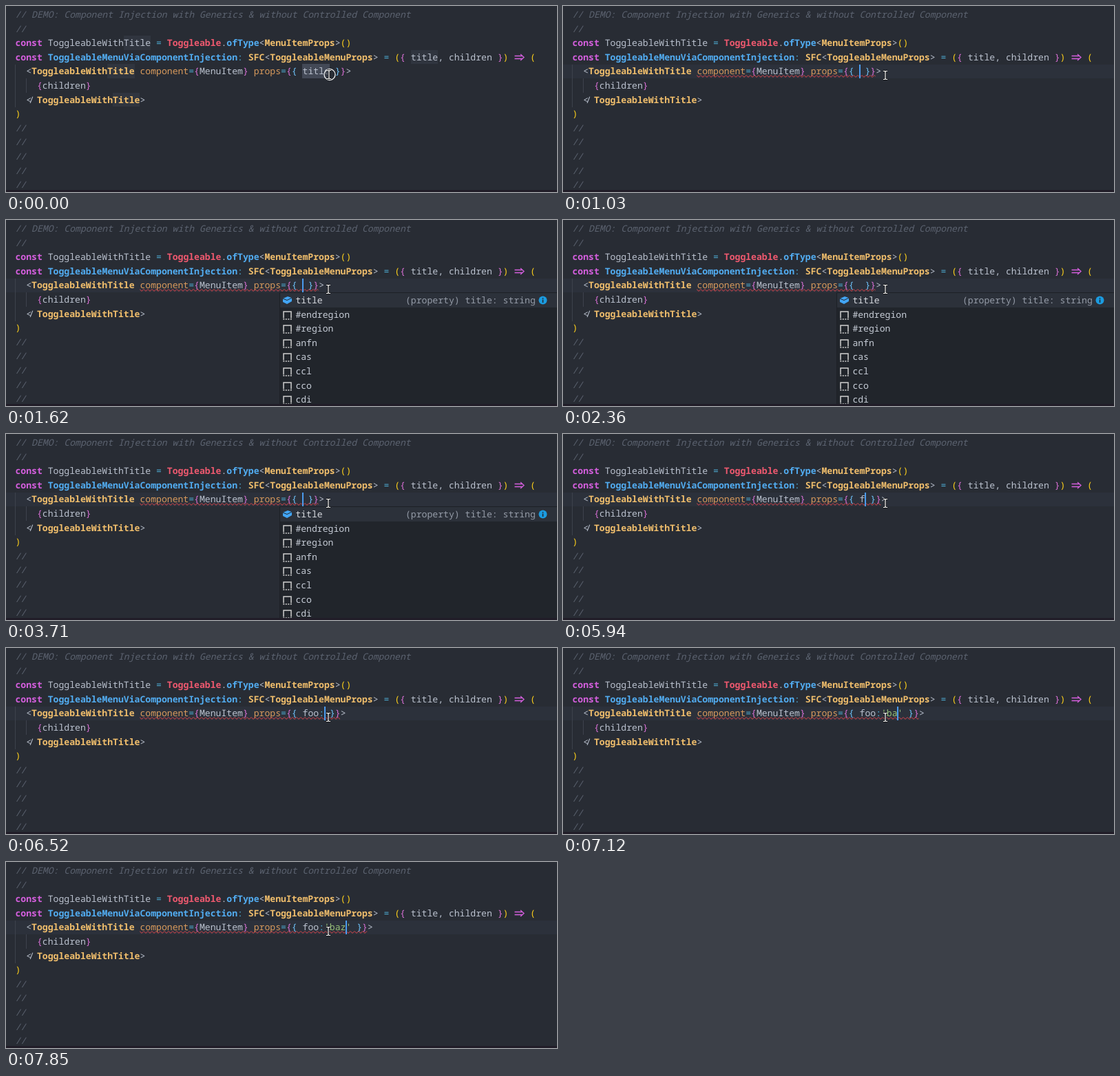
An HTML page for the animation above (8000 ms loop, 800 px wide and 270 px high).

```html
<!DOCTYPE html>
<html lang="en">
<head>
<meta charset="utf-8">
<title>Editor demo</title>
<style>
html, body { margin: 0; width: 100%; height: 100%; overflow: hidden; background: #282c34; }
#stage {
  position: relative; width: 800px; height: 270px; overflow: hidden; background: #282c34;
  font: 500 13.125px/20.6px "Noto Sans Mono", monospace; color: #bbc2cf;
  text-rendering: geometricPrecision; font-variant-ligatures: none;
}
#stage div, #stage svg { position: absolute; }
#stage [hidden] { display: none; }
#code { left: 13.5px; top: 2.1px; white-space: pre; }
#code > pre { position: relative; margin: 0; font: inherit; }
b, i { font-weight: inherit; font-style: normal; }
.comment { color: #5c6370; font-style: italic; font-weight: 400; }
.key { color: #d55fde; font-weight: 600; }
.type { color: #f0be6c; font-weight: 600; }
.class { color: #ef596f; font-weight: 600; }
.func { color: #52adf2; font-weight: 600; }
.op { color: #4fb0d8; }
.attr { color: #d89a5c; }
.str { color: #98c379; }
.gold { color: #ffd11a; }
.pink { color: #da70d6; }
.sky { color: #6fc3fa; }
.slash { position: relative; left: -4px; }
#active { left: 0; top: 84.7px; width: 800px; height: 20.3px; background: #2c313b; }
.guide { width: 1px; background: #3d424c; }
.match { width: 5ch; height: 20.6px; background: #30353f; }
.match.chosen { background: #434956; }
#caret { top: 83.4px; width: 2px; height: 19.6px; background: #4a9bee; }
#wave { left: 23ch; top: 98.4px; height: 4px; }
#strip { left: 0; top: 267px; width: 800px; height: 3px; background: #211d28; }
#menu { left: 397px; top: 105px; width: 410px; height: 170px; background: #21252b; border: 1px solid #1d2026; }
.row { left: 0; width: 410px; height: 20.6px; white-space: pre; color: #c6ccd6; }
.row span { position: absolute; left: 22.4px; }
.row.first { background: #2c313a; color: #d7dae0; }
.row .detail { left: 182px; color: #959ca8; }
.row svg { left: 3px; top: 3px; }
</style>
</head>
<body>
<div id="stage">
  <div id="active"></div>
  <div class="guide" style="left:13px;top:85px;height:62px"></div>
  <div class="guide" style="left:29px;top:105px;height:21px"></div>
  <div id="code"><div id="matches"></div><pre><b class="comment">// DEMO: Component Injection with Generics &amp; without Controlled Component
//</b>
<b class="key">const</b> ToggleableWithTitle <b class="op">=</b> <b class="class">Toggleable</b>.<b class="func">ofType</b>&lt;<b class="type">MenuItemProps</b>&gt;<b class="gold">()</b>
<b class="key">const</b> <b class="func">ToggleableMenuViaComponentInjection</b><b class="op">:</b> <b class="type">SFC</b>&lt;<b class="type">ToggleableMenuProps</b>&gt; <b class="op">=</b> <b class="gold">(</b><b class="pink">{</b> title, children <b class="pink">}</b><b class="gold">)</b>    <b class="gold">(</b>
  &lt;<b class="type">ToggleableWithTitle</b> <b class="attr">component</b><b class="op">=</b><b class="pink">{</b>MenuItem<b class="pink">}</b> <b class="attr">props</b><b class="op">=</b><b class="pink">{</b><b class="sky">{</b> <i id="value"></i> <b class="sky">}</b><b class="pink">}</b>&gt;
    <b class="pink">{</b>children<b class="pink">}</b>
  &lt;<b class="slash">/</b><b class="type">ToggleableWithTitle</b>&gt;
<b class="gold">)</b>
<b class="comment">//
//
//
//
//</b></pre>
    <svg id="wave"><defs><pattern id="zig" width="6" height="4" patternUnits="userSpaceOnUse">
      <path d="M-1 1L0 .4L3 3.4L6 .4L7 1" fill="none" stroke="#e5454c"/>
    </pattern></defs><rect width="100%" height="4" fill="url(#zig)"/></svg>
    <div id="caret"></div>
  </div>
  <svg style="left:737px;top:67px" width="18" height="15" fill="none" stroke="#d55fde" stroke-width="1.3">
    <path d="M1.5 5.5H13M1.5 9.5H13M10 3L15 7.5L10 12"/>
  </svg>
  <div id="menu"></div>
  <div id="strip"></div>
  <svg style="left:456px;top:86px" width="28" height="28" fill="none">
    <circle id="press" cx="14" cy="13.5" r="8" fill="#282c34" fill-opacity=".5" stroke="#f2f2f2" stroke-width="1.3"/>
    <g id="pointer">
      <path d="M9 8.5H11L12 9.5L13 8.5H15M12 9.5V19.5M9 20.5H11L12 19.5L13 20.5H15" stroke="#111" stroke-width="2.6"/>
      <path d="M9 8.5H11L12 9.5L13 8.5H15M12 9.5V19.5M9 20.5H11L12 19.5L13 20.5H15" stroke="#fff" stroke-width="1.2"/>
    </g>
  </svg>
</div>
<script>
const LOOP = 8000, LINE = 20.6, VALUE_COL = 53;
const el = id => document.getElementById(id);

// Occurrences of the selected word: line, column
const words = [[2, 20], [3, 73], [4, 17], [6, 18], [4, VALUE_COL]];
el('matches').innerHTML = words.map(([line, col], i) =>
  `<div class="match${i === 4 ? ' chosen' : ''}" style="left:${col}ch;top:${line * LINE}px"></div>`).join('');

const cube = `<svg width="15" height="15"><path d="M1 5L8 2L14 4V9L7 13L1 10Z" fill="#42a5f5"/>
  <path d="M1 5L7 7.5L14 4" fill="none" stroke="#21252b"/></svg>`;
const snippet = `<svg width="16" height="16" fill="none" stroke="#d0d0d0" stroke-width="1.5">
  <path d="M2 12.5V3H13V12.5"/><path d="M1.3 14H14" stroke-dasharray="2 1.5"/></svg>`;
const info = `<svg style="left:375px;top:4px" width="13" height="13"><circle cx="6.5" cy="6.5" r="6" fill="#1b9be0"/>
  <path d="M6.5 3V4.4M6.5 5.5V10" stroke="#21252b" stroke-width="1.5"/></svg>`;
const items = ['title', '#endregion', '#region', 'anfn', 'cas', 'ccl', 'cco', 'cdi'];
el('menu').innerHTML = items.map((name, i) =>
  `<div class="row${i ? '' : ' first'}" style="top:${i * LINE}px">${i ? snippet : cube}<span>${name}</span>${
    i ? '' : `<span class="detail">(property) title: string</span>${info}`}</div>`).join('');

// Each track lists [start ms, value]; a value holds until the next entry.
const tracks = {
  press: [[0, true], [150, false]],
  selected: [[0, true], [590, false]],
  text: [[0, 'title'], [590, ''], [3850, 'title'], [5040, ''], [5940, 'f'], [6090, 'fo'],
    [6230, 'foo'], [6520, 'foo:'], [6820, "foo:''"], [6970, "foo:'b'"], [7120, "foo:'ba'"], [7410, "foo:'baz'"]],
  caret: [[0, false], [590, true], [1180, false], [1620, true], [2210, false], [2660, true], [3110, false],
    [3710, true], [4300, false], [4590, true], [5490, false], [5940, true]],
  error: [[0, false], [1030, true], [4150, false], [5340, true]],
  menu: [[0, false], [1330, true], [3850, false]],
};
const at = (name, time) => tracks[name].findLast(([start]) => start <= time)[1];

function colorize(text) {
  return text.replace(/^(foo)(:)('.*)?$/, (_, key, colon, string = '') =>
    `${key}<b class="op">${colon}</b><b class="str">${string}</b>`);
}

let shownText = null;
function render(time) {
  const text = at('text', time), selected = at('selected', time), press = at('press', time);
  if (text !== shownText) {
    el('value').innerHTML = colorize(text);
    shownText = text;
  }
  const caretCol = VALUE_COL + text.length - (text.endsWith("'") ? 1 : 0);
  el('caret').style.left = `${caretCol}ch`;
  el('caret').hidden = !at('caret', time);
  el('matches').hidden = !selected;
  el('active').hidden = selected;
  el('menu').hidden = !at('menu', time);
  el('wave').style.width = `${VALUE_COL + text.length + 3 - 23}ch`;
  el('wave').style.display = at('error', time) ? 'block' : 'none';
  el('press').style.display = press ? '' : 'none';
  el('pointer').setAttribute('transform', press ? 'translate(1 -1)' : '');
}

const begin = performance.now();
function tick() {
  render((performance.now() - begin) % LOOP);
  requestAnimationFrame(tick);
}
tick();
</script>
</body>
</html>
```
